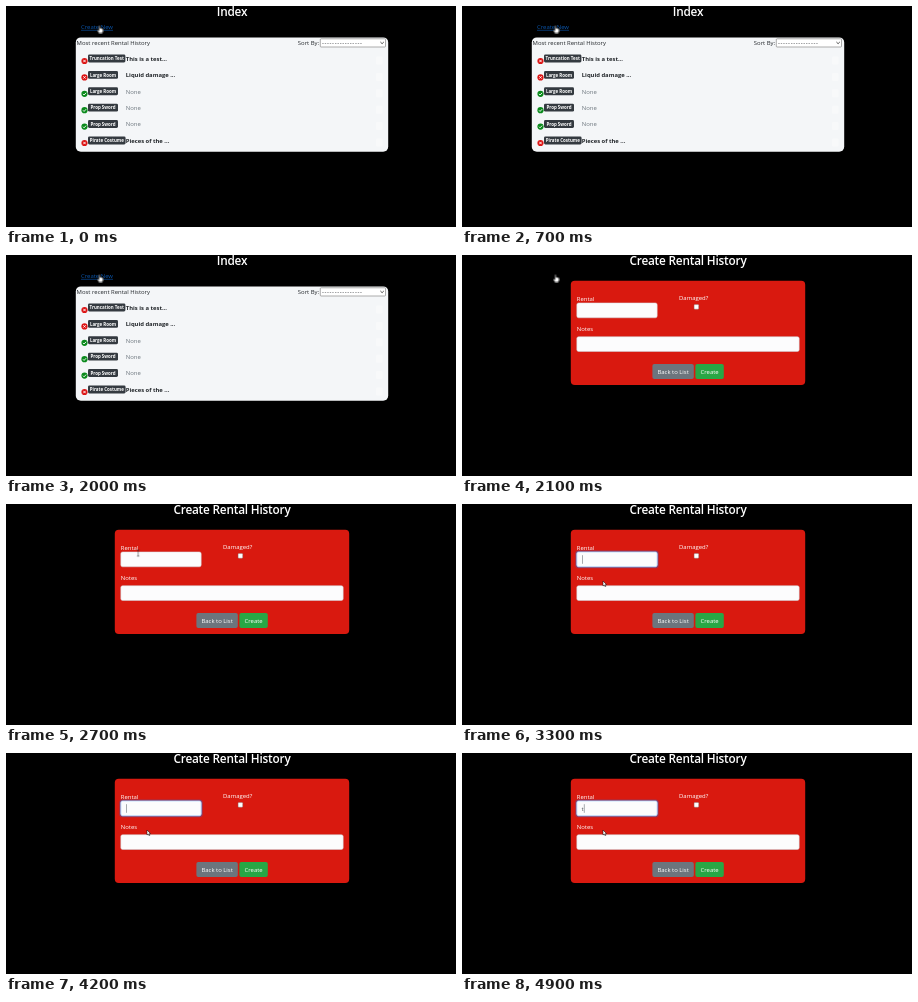
Animation of 450x221 px, one loop 5 s. Source, as an HTML page:

```html
<!DOCTYPE html>
<html lang="en">
<head>
<meta charset="utf-8">
<title>Rental History</title>
<style>
  html, body { margin: 0; width: 100%; height: 100%; overflow: hidden; background: #000; }
  svg { display: block; width: 450px; height: 221px; }
  text { font: 400 5.95px "Open Sans", "Noto Sans", sans-serif; fill: #212529; }
  .title { font-size: 11.8px; font-weight: 600; fill: #fff; text-anchor: middle; letter-spacing: -.2px; }
  .link { fill: #0a56ad; }
  .dashes { letter-spacing: .62px; }
  .badge { font-size: 4.45px; font-weight: 700; fill: #fff; text-anchor: middle; }
  .note { font-weight: 700; font-size: 5.85px; }
  .none { fill: #6c757d; }
  .form text { fill: #fff; }
  .form .typed { fill: #495057; }
  .mid { text-anchor: middle; }
  .field { fill: #fcfcfd; stroke: #ced4da; stroke-width: .5; }

  .index, .form, .ring, .focus, .caret, .typed, .hand, .arrow, .beam {
    animation: 5s step-end infinite;
  }
  .index { animation-name: index; }
  .form { animation-name: form; }
  .ring { animation-name: ring; }
  .focus { animation-name: focus; animation-timing-function: linear; }
  .caret { animation-name: caret; }
  .typed { animation-name: typed; }
  .hand { animation-name: hand; }
  .arrow { animation-name: arrow; }
  .beam { animation-name: beam; }
  .pointer { animation: move 5s ease-in-out infinite; }

  @keyframes index { 0% { visibility: visible } 41.9%, 100% { visibility: hidden } }
  @keyframes form { 0% { visibility: hidden } 41.9%, 100% { visibility: visible } }
  @keyframes ring { 0% { opacity: 0 } 26.9% { opacity: 1 } 33.9%, 100% { opacity: 0 } }
  @keyframes focus { 0%, 60% { opacity: 0 } 63%, 100% { opacity: 1 } }
  @keyframes caret {
    0% { opacity: 0; transform: none }
    60% { opacity: 1 }
    70.6% { opacity: 0 }
    81.2% { opacity: 1 }
    91.8% { opacity: 0; transform: none }
    97.9%, 100% { opacity: 1; transform: translateX(1.8px) }
  }
  @keyframes typed { 0% { opacity: 0 } 97.9%, 100% { opacity: 1 } }
  @keyframes hand { 0% { opacity: 1 } 43.9%, 100% { opacity: 0 } }
  @keyframes arrow { 0% { opacity: 0 } 43.9% { opacity: 1 } 54% { opacity: 0 } 62.5%, 100% { opacity: 1 } }
  @keyframes beam { 0% { opacity: 0 } 54% { opacity: 1 } 62.5%, 100% { opacity: 0 } }
  @keyframes move {
    0%, 43.9% { transform: translate(93.5px, 19.5px); animation-timing-function: ease-in }
    48% { transform: translate(102px, 30px); animation-timing-function: linear }
    54% { transform: translate(132px, 49px); animation-timing-function: ease-out }
    57%, 60% { transform: translate(144px, 56px) }
    65%, 100% { transform: translate(141px, 77px) }
  }
</style>
</head>
<body>
<svg viewBox="0 0 450 221">
  <rect width="450" height="221"/>

  <g class="index">
    <text class="title" x="226" y="10.2">Index</text>
    <text class="link" x="75" y="23.2">Create New</text>
    <path d="M75 24.3h32" stroke="#0a56ad" stroke-width=".6"/>
    <rect x="69.8" y="31.4" width="312.4" height="114.4" rx="5" fill="#f4f6f8"/>
    <text x="70.6" y="39">Most recent Rental History</text>
    <text x="291.8" y="39">Sort By:</text>
    <rect x="314.3" y="32.8" width="65.2" height="8.2" rx=".8" fill="#fff" stroke="#767676" stroke-width=".6"/>
    <text class="dashes" x="316" y="38.8">----------------</text>
    <path d="M374.4 36l1.7 1.7 1.7-1.7" fill="none" stroke="#222" stroke-width=".8"/>
    <g id="rows"></g>
  </g>

  <g class="form">
    <text class="title" x="226" y="10.2">Create Rental History</text>
    <rect x="108.8" y="25.8" width="234.4" height="104.2" rx="4" fill="#d9190f"/>
    <text x="114.8" y="45.7">Rental</text>
    <text x="217" y="45.4">Damaged?</text>
    <text x="114.8" y="76.4">Notes</text>
    <rect class="field" x="114.8" y="47.9" width="80.4" height="14.9" rx="1.8"/>
    <g class="focus">
      <rect x="114" y="47.1" width="82" height="16.5" rx="2.4" fill="none" stroke="#007bff" stroke-opacity=".3" stroke-width="1.4"/>
      <rect x="114.8" y="47.9" width="80.4" height="14.9" rx="1.8" fill="#fcfcfd" stroke="#80bdff" stroke-width=".6"/>
    </g>
    <text class="typed" x="119.6" y="58">t</text>
    <path class="caret" d="M120.3 51.2v8.6" stroke="#495057" stroke-width=".6"/>
    <rect class="field" x="114.8" y="81.7" width="222.4" height="14.8" rx="1.8"/>
    <rect x="232.1" y="49.6" width="4.6" height="4.6" rx=".7" fill="#fff" stroke="#767676" stroke-width=".4"/>
    <rect x="190.4" y="108.9" width="41.4" height="15.1" rx="1.9" fill="#6c757d"/>
    <text class="mid" x="211.1" y="118.7">Back to List</text>
    <rect x="233.4" y="108.9" width="28.4" height="15.1" rx="1.9" fill="#28a745"/>
    <text class="mid" x="247.6" y="118.7">Create</text>
  </g>

  <circle class="ring" cx="94" cy="20" r="12" fill="none" stroke="#c01414" stroke-width="1.1"/>

  <g class="pointer">
    <path class="hand" d="M-.6 .5q.6-.8 1.2 0v2.2q2.6 .1 3 1.2v1.9l-.9 1.9h-3.1l-2-2.7q.2-1 1.2-.3l.6.5z"
      fill="#fff" stroke="#000" stroke-width=".5" stroke-linejoin="round"/>
    <path class="arrow" d="M0 0v5l1.2-1 .8 1.7 .8-.4-.7-1.6h1.5z"
      fill="#fff" stroke="#000" stroke-width=".5" stroke-linejoin="round"/>
    <path class="beam" d="M-1.2-3h2.4M0-3v6M-1.2 3h2.4" fill="none" stroke="#222" stroke-width=".5"/>
  </g>
</svg>
<script>
  // item, badge width, note, damaged
  const rentals = [
    ["Truncation Test", 37.4, "This is a test...", true],
    ["Large Room", 30, "Liquid damage ...", true],
    ["Large Room", 30, "None", false],
    ["Prop Sword", 30, "None", false],
    ["Prop Sword", 30, "None", false],
    ["Pirate Costume", 37.6, "Pieces of the ...", true]
  ];
  const cross = "M77.3 1.3l2.4 2.4m0-2.4l-2.4 2.4";
  const check = "M77 2.6l1.1 1.1 2-2.2";

  const row = ([item, width, note, damaged], i) => `
    <g transform="translate(0 ${52.5 + i * 16.4})">
      <circle cx="78.5" cy="2.5" r="3.1" fill="${damaged ? "#dc1414" : "#0b8a1c"}"/>
      <path d="${damaged ? cross : check}" fill="none" stroke="#fff" stroke-width=".9"/>
      <rect x="82" y="-4" width="${width}" height="7.9" rx="1.4" fill="#343a40"/>
      <text class="badge" x="${82 + width / 2}" y="1.6">${item}</text>
      <text class="${damaged ? "note" : "none"}" x="119.8" y="2.2">${note}</text>
      <rect x="370" y="-2" width="6.5" height="8" rx="1" fill="#f8f9fa"/>
    </g>`;

  document.getElementById("rows").innerHTML = rentals.map(row).join("");
</script>
</body>
</html>
```
